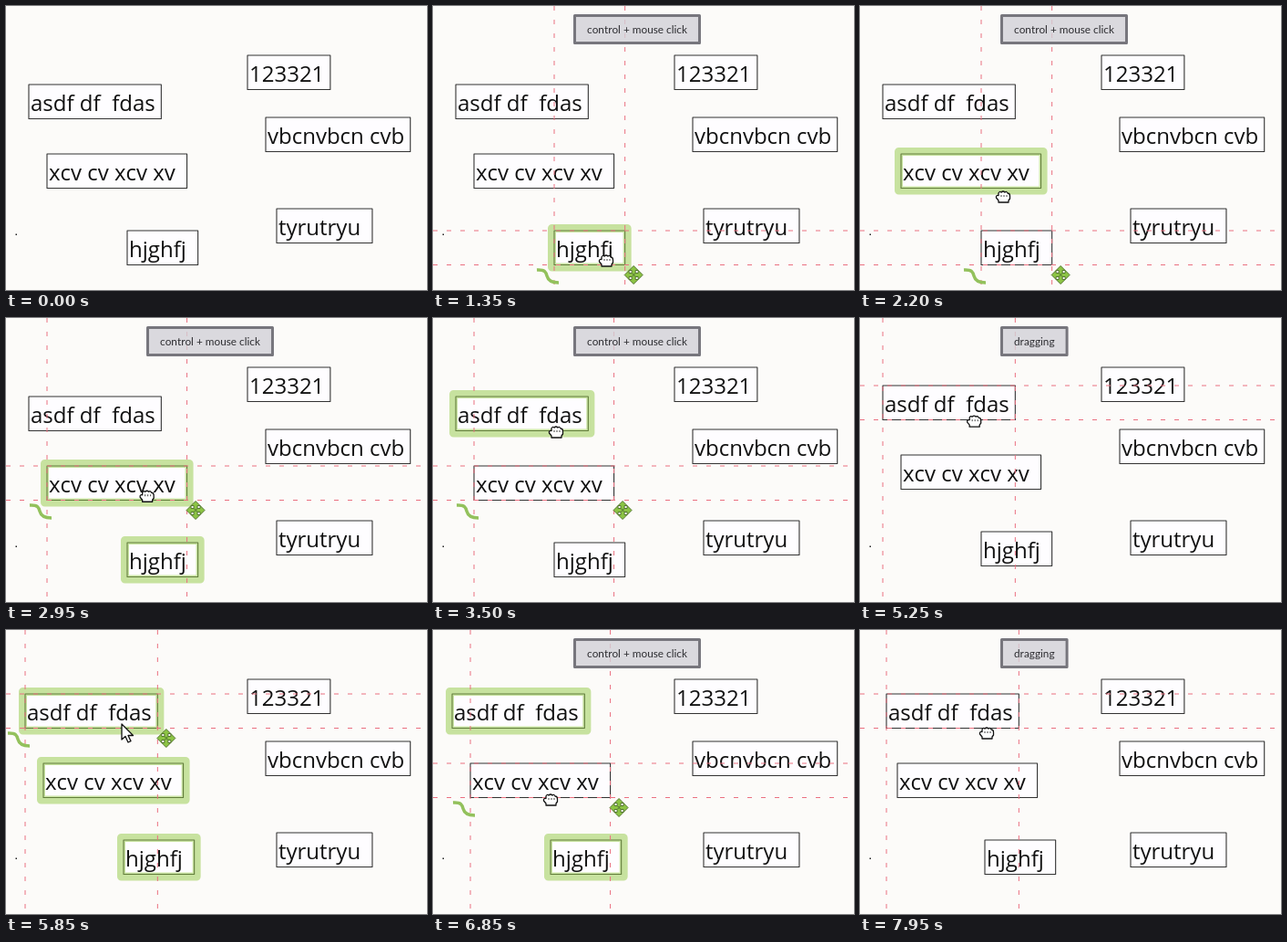
An HTML page with a canvas that plays this animation: 462 by 311 pixels, repeating every 8 s.

```html
<!DOCTYPE html>
<html lang="en">
<head>
<meta charset="utf-8">
<title>Dragging a selection</title>
<style>
html, body { margin: 0; width: 100%; height: 100%; overflow: hidden; background: #fcfbf9; }
canvas { display: block; }
</style>
</head>
<body>
<canvas id="stage" width="462" height="311"></canvas>
<script>
const ctx = document.getElementById('stage').getContext('2d');
const LOOP = 8000, STEP = 50, GRID = 4, BOX_H = 37.5, MARGIN = 7;
const BOX_FONT = '24px "Open Sans", "Noto Sans", sans-serif';
const LABEL_FONT = '11.8px Lato, "Open Sans", sans-serif';

ctx.fontKerning = 'none';
ctx.lineJoin = 'round';

function textWidth(text, font) {
  ctx.font = font;
  return ctx.measureText(text).width;
}

function makeBox(x, y, text) {
  return { x, y, text, w: textWidth(text + ' ', BOX_FONT) + 2.3 };
}

const boxes = {
  a: makeBox(25, 86, 'asdf df  fdas'),
  b: makeBox(45, 162, 'xcv cv xcv xv '),
  c: makeBox(133, 246, 'hjghfj '),
  d: makeBox(265, 54, '123321'),
  e: makeBox(285, 122, 'vbcnvbcn cvb'),
  f: makeBox(297, 222, 'tyrutryu ')
};

// A click toggles a box in the selection; a drag moves the whole selection.
const presses = [
  { id: 'c', at: 1350, until: 2400 },
  { id: 'b', at: 2600, until: 3650 },
  { id: 'a', at: 3650, until: 4450 },
  { id: 'a', at: 4450, until: 5700, drag: true },
  { id: 'b', at: 6850, until: 7800 },
  { id: 'a', at: 7800, until: 8000, drag: true }
];

// Pointer moves: start, end, x, y
const ENTER = 600;
const moves = [
  [ENTER, 900, 190, 272], [1800, 2200, 157, 202],
  [2900, 3050, 148, 149], [3150, 3300, 162, 121], [3450, 3500, 135, 118], [3900, 4000, 124, 118],
  [4450, 4750, 140, 118], [4750, 5500, 120, 102],
  [5700, 5850, 127, 103], [6100, 6400, 129, 179], [7000, 7550, 131, 106], [7800, 7950, 139, 106]
];

function pointerAt(t) {
  let x = 192, y = 311;
  for (const [start, end, toX, toY] of moves) {
    const u = Math.min(1, Math.max(0, (t - start) / (end - start)));
    const k = u * u * (3 - 2 * u);
    x += (toX - x) * k;
    y += (toY - y) * k;
  }
  return { x, y };
}

function selectionAt(t) {
  const chosen = new Set();
  for (const { id, at, drag } of presses) {
    if (at <= t && !drag && !chosen.delete(id)) chosen.add(id);
  }
  return chosen;
}

const snap = v => Math.round(v / GRID) * GRID;

function boxAt(id, t) {
  const box = { ...boxes[id] };
  for (const { at, until, drag } of presses) {
    if (!drag || at > t || !selectionAt(at).has(id)) continue;
    const from = pointerAt(at), to = pointerAt(Math.min(t, until));
    box.x += snap(to.x - from.x);
    box.y += snap(to.y - from.y);
  }
  return box;
}

function isOver({ x, y, w }, p) {
  return p.x > x - MARGIN && p.x < x + w + MARGIN &&
    p.y > y - MARGIN && p.y < y + BOX_H + MARGIN;
}

function paint(path, fill, stroke, width = 1) {
  ctx.lineWidth = width;
  if (fill) { ctx.fillStyle = fill; ctx.fill(path); }
  if (stroke) { ctx.strokeStyle = stroke; ctx.stroke(path); }
}

function rect(x, y, w, h) {
  const path = new Path2D();
  path.rect(x, y, w, h);
  return path;
}

function write(text, x, y, font, color) {
  ctx.font = font;
  ctx.fillStyle = color;
  ctx.fillText(text, x, y);
}

function drawAt(x, y, draw) {
  ctx.save();
  ctx.translate(x, y);
  draw();
  ctx.restore();
}

function drawBox({ x, y, w, text }, glowing) {
  paint(rect(x, y, w, BOX_H), '#fefdff', '#333', 1.1);
  write(text, x + 2, y + 28.5, BOX_FONT, '#111');
  if (glowing) {
    paint(rect(x - 2.5, y - 2.5, w + 5, BOX_H + 5), null, 'rgba(148,201,71,.5)', 9);
  }
}

function drawGuides({ x, y, w }) {
  const lines = new Path2D();
  for (const gx of [x, x + w]) { lines.moveTo(gx, 0); lines.lineTo(gx, 311); }
  for (const gy of [y, y + BOX_H]) { lines.moveTo(0, gy); lines.lineTo(462, gy); }
  ctx.setLineDash([5, 10]);
  paint(lines, null, '#ea7080');
  ctx.setLineDash([]);
}

const curve = new Path2D('M-19 5.500C-10 5-9 8-8 12S-4 19.500 5 19.500');
const arrowhead = new Path2D('M-2-2V-5H-5L0-10 5-5H2V-2L0 0Z');
const arrow = new Path2D('M0 0V17L4 13.500 7 20 10 18.600 7 12.500H12.500Z');
const fist = new Path2D('M-5 6V4L-7.500 1Q-8-2-5-1.500V-4Q-4-6.500-2-5Q0-7 2-5Q4-6.500 5-4Q7.500-4 7.500-1V2L6 4V6Z');
const knuckles = new Path2D('M-2-2V0M1-2V0M4-2V0');

function drawHandles({ x, y, w }) {
  drawAt(x, y + BOX_H, () => paint(curve, null, '#93c15c', 3.4));
  drawAt(x + w + 9.5, y + BOX_H + 11, () => {
    for (let i = 0; i < 4; i++) {
      paint(arrowhead, '#8cc444', '#547530');
      ctx.rotate(Math.PI / 2);
    }
  });
}

function drawLabel(text) {
  const w = textWidth(text, LABEL_FONT) + 27;
  paint(rect(155.5, 10.5, w, 30), 'rgba(210,209,216,.8)', '#77767d', 3);
  write(text, 169, 30, LABEL_FONT, '#2c2c30');
}

function drawPointer({ x, y }, closed) {
  drawAt(x, closed ? y + 7 : y, () => {
    paint(closed ? fist : arrow, '#fff', '#111', 1.3);
    if (closed) paint(knuckles, null, '#444');
  });
}

function draw(t) {
  const press = presses.filter(p => p.at <= t).pop();
  const held = press && t < press.until;
  const dragging = held && press.drag;
  const dropped = press && press.drag && !held;
  const pointer = pointerAt(t), selection = selectionAt(t);
  const placed = Object.keys(boxes).map(id => ({ id, ...boxAt(id, t) }));
  const over = t >= ENTER && placed.find(box => isOver(box, pointer));
  const onActive = over && press && over.id === press.id;

  let lit = new Set();
  if (over && !dragging) {
    lit = onActive || selection.has(over.id) ? selection : new Set([over.id]);
  }

  ctx.fillStyle = '#fcfbf9';
  ctx.fillRect(0, 0, 462, 311);
  ctx.fillStyle = '#222';
  ctx.fillRect(10.5, 249.5, 1.5, 1.5);

  for (const box of placed) drawBox(box, lit.has(box.id));
  if (press) {
    const active = placed.find(box => box.id === press.id);
    drawGuides(active);
    if (!dragging) drawHandles(active);
  }
  if (held) drawLabel(dragging ? 'dragging' : 'control + mouse click');
  if (t >= ENTER) drawPointer(pointer, over && !(dropped && onActive));
}

function tick() {
  draw(Math.floor(performance.now() % LOOP / STEP) * STEP);
  requestAnimationFrame(tick);
}
tick();
</script>
</body>
</html>
```
